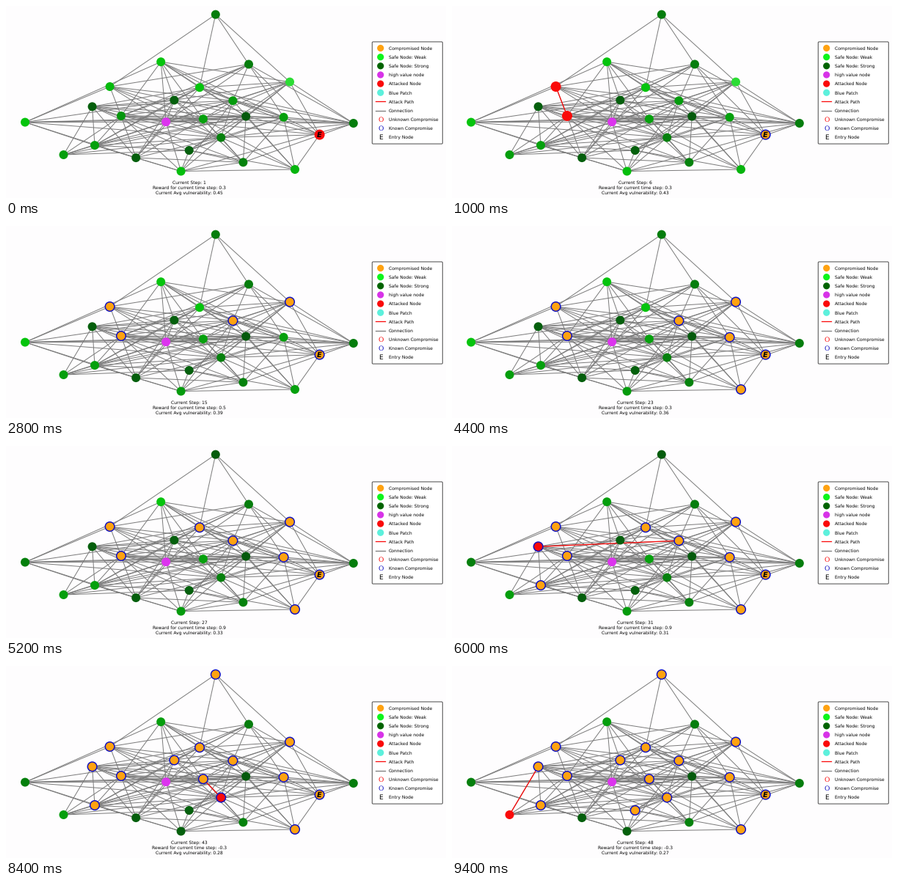
Animation of 600 by 262 pixels, one loop 9.6 s. Source, as a matplotlib script:

```python
import matplotlib.pyplot as plt
import numpy as np
from matplotlib.animation import FuncAnimation
from matplotlib.collections import LineCollection
from matplotlib.patches import Circle, FancyBboxPatch

plt.rcParams["text.hinting"] = "no_hinting"

W, H, DPI = 600, 262, 100
STEPS, STEP_MS = 48, 200
PT = 72 / DPI  # points per pixel

NODES = {
    "A": (285.8, 11.6), "B": (211.2, 76.2), "C": (331, 79.5),
    "D": (387, 103.6), "E": (141.6, 110), "F": (264, 111.2),
    "G": (229.4, 128.5), "H": (309.4, 129.2), "I": (117.6, 137.3),
    "J": (157, 150), "K": (218.2, 158.2), "L": (268.9, 154.2),
    "M": (327.2, 150.6), "N": (378.6, 151.8), "O": (26, 158.6),
    "P": (473.8, 160), "Q": (427.6, 175.6), "R": (293.2, 179.5),
    "S": (121, 190.1), "T": (249.7, 197), "U": (78.5, 203),
    "V": (177.2, 207.1), "W": (323.4, 213.3), "X": (238.6, 225.5),
    "Y": (394, 223),
}

LINKS = {
    "A": "CDEF", "B": "DFGHJKLMNO", "C": "EFGHJKNPQ",
    "D": "FGHKLMPQRT", "E": "GHJKLOR", "F": "GHIJMNPSV",
    "G": "IKLMNOSVW", "H": "IJKLNPQRSXY", "I": "JKLMSTUVW",
    "J": "KLMQRSUVX", "K": "LMNOPRUVX", "L": "MOPRSVWY",
    "M": "NOPQRSTUWY", "N": "PQRTWY", "O": "RSV", "P": "RWX",
    "Q": "RY", "R": "STUVWXY", "S": "TUVX", "T": "UWXY",
    "V": "WX", "W": "X", "X": "Y",
}

# Green level of each safe node, and later hardening as (step, level)
LEVEL = {
    "A": 125, "B": 196, "C": 125, "E": 185, "F": 196, "G": 95, "H": 155,
    "I": 95, "J": 150, "L": 160, "M": 90, "N": 160, "O": 196, "P": 125,
    "R": 128, "S": 160, "T": 96, "U": 158, "V": 95, "W": 130, "X": 190,
    "Y": 180,
}
HARDENED = {
    "X": [(10, 155), (42, 96)], "Y": [(9, 160)], "O": [(27, 128)],
    "B": [(29, 158)], "A": [(25, 92)],
}

# step: (attacker, target)
ATTACKS = {
    1: (None, "Q"), 3: ("Q", "J"), 5: ("Q", "J"), 6: ("E", "J"),
    8: ("Q", "H"), 10: ("J", "H"), 13: ("H", "D"), 17: ("D", "N"),
    20: ("N", "Y"), 21: ("H", "Y"), 24: ("E", "F"), 26: ("H", "F"),
    28: ("J", "S"), 30: ("E", "I"), 31: ("H", "I"), 34: ("S", "L"),
    36: ("F", "A"), 38: ("Y", "X"), 40: ("E", "O"), 41: ("H", "G"),
    43: ("L", "R"), 45: ("Y", "X"), 46: ("S", "T"), 47: ("F", "G"),
    48: ("I", "U"),
}
# step at which a node falls, and at which that becomes known
FALLEN = {
    "Q": 2, "E": 7, "J": 7, "H": 10, "D": 13, "N": 17, "Y": 21, "F": 26,
    "S": 28, "I": 31, "A": 36, "L": 34, "G": 41, "R": 43, "T": 46,
}
KNOWN = {"Q": 4, "A": 39}

REWARDS = [(1, "0.3"), (8, "0.5"), (17, "0.3"), (26, "0.9"), (34, "0.3"),
           (36, "-1.18"), (40, "-0.3")]
VULN_STEPS = [1, 6, 15, 23, 31, 38, 48]
VULN = [0.45, 0.43, 0.39, 0.36, 0.31, 0.29, 0.27]

ORANGE, RED, BLUE, GRAY = "#ffa210", "#fa0a0a", "#1010c0", "#7c7c7c"
MAGENTA, TURQUOISE = "#dc34ee", "#5cf0dc"

fig = plt.figure(figsize=(W / DPI, H / DPI), dpi=DPI, facecolor="#fefdfe")
ax = fig.add_axes([0, 0, 1, 1])
ax.set(xlim=(0, W), ylim=(H, 0))
ax.axis("off")


def label(x, y, text="", px=6, **style):
    """Text whose capitals are centred on y."""
    style = {"family": "DejaVu Sans", "va": "baseline", **style}
    return ax.text(x, y + 0.365 * px, text, fontsize=px * PT, zorder=6,
                   **style)


def draw_legend():
    ax.add_patch(FancyBboxPatch(
        (499.3, 48.9), 96, 139.2, boxstyle="round,pad=0,rounding_size=1.2",
        fc="white", ec="#4c4c4c", lw=PT, zorder=1))
    rows = [
        ("Compromised Node", "dot", ORANGE),
        ("Safe Node: Weak", "dot", "#0cf51c"),
        ("Safe Node: Strong", "dot", "#006400"),
        ("high value node", "dot", "#d733e8"),
        ("Attacked Node", "dot", RED),
        ("Blue Patch", "dot", TURQUOISE),
        ("Attack Path", "line", RED),
        ("Connection", "line", GRAY),
        ("Unknown Compromise", "O", RED),
        ("Known Compromise", "O", BLUE),
        ("Entry Node", "E", "black"),
    ]
    for i, (name, kind, color) in enumerate(rows):
        y = 57.5 + 12.15 * i
        label(521.5, y, name)
        if kind == "dot":
            ax.add_patch(Circle((510.7, y), 4.6, fc=color, lw=0, zorder=3))
        elif kind == "line":
            ax.plot([504, 517.3], [y, y], color=color, lw=1.3 * PT, zorder=3)
        else:
            family = "DejaVu Serif" if kind == "O" else "DejaVu Sans"
            label(510.7, y, kind, 9, color=color, ha="center", family=family)


def green(node, step):
    if node == "K":
        return MAGENTA
    if node == "D":
        return "#2cdc34"
    level = LEVEL.get(node, 150)
    for start, value in HARDENED.get(node, []):
        if step >= start:
            level = value
    return (0.02, level / 255, 0.05)


draw_legend()
ax.add_collection(LineCollection(
    [(NODES[a], NODES[b]) for a, ends in LINKS.items() for b in ends],
    colors=GRAY, linewidths=PT, zorder=1))
path, = ax.plot([], [], color=RED, lw=1.3 * PT, zorder=2)
discs = {n: ax.add_patch(Circle(p, 6, zorder=4)) for n, p in NODES.items()}
label(*NODES["Q"], "E", 10, ha="center", weight="bold", style="italic")
captions = [label(249.8, y, ha="center") for y in (240.3, 247.4, 254.6)]


def update(frame):
    step = frame + 1
    source, target = ATTACKS.get(step, (None, None))
    for node, disc in discs.items():
        fallen = step >= FALLEN.get(node, STEPS + 1)
        hit = node == target or (node == source and not fallen)
        color = RED if hit else ORANGE if fallen else green(node, step)
        disc.set_facecolor(color)
        if fallen:
            known = step >= KNOWN.get(node, 0)
            disc.set_edgecolor(BLUE if known else "#c81818")
            disc.set_linewidth(1.5 * PT)
            disc.set_radius(6.3)
        else:
            disc.set_linewidth(0)
            disc.set_radius(7 if hit and step <= 6 else 6)

    ends = [NODES[source], NODES[target]] if source else []
    path.set_data([p[0] for p in ends], [p[1] for p in ends])

    reward = [text for start, text in REWARDS if step >= start][-1]
    vuln = np.interp(step, VULN_STEPS, VULN)
    captions[0].set_text(f"Current Step: {step}")
    captions[1].set_text(f"Reward for current time step: {reward}")
    captions[2].set_text(f"Current Avg vulnerability: {vuln:.2f}")
    return [path, *discs.values(), *captions]


anim = FuncAnimation(fig, update, frames=STEPS, interval=STEP_MS,
                     repeat=True, repeat_delay=0, blit=False)
plt.show()
```
